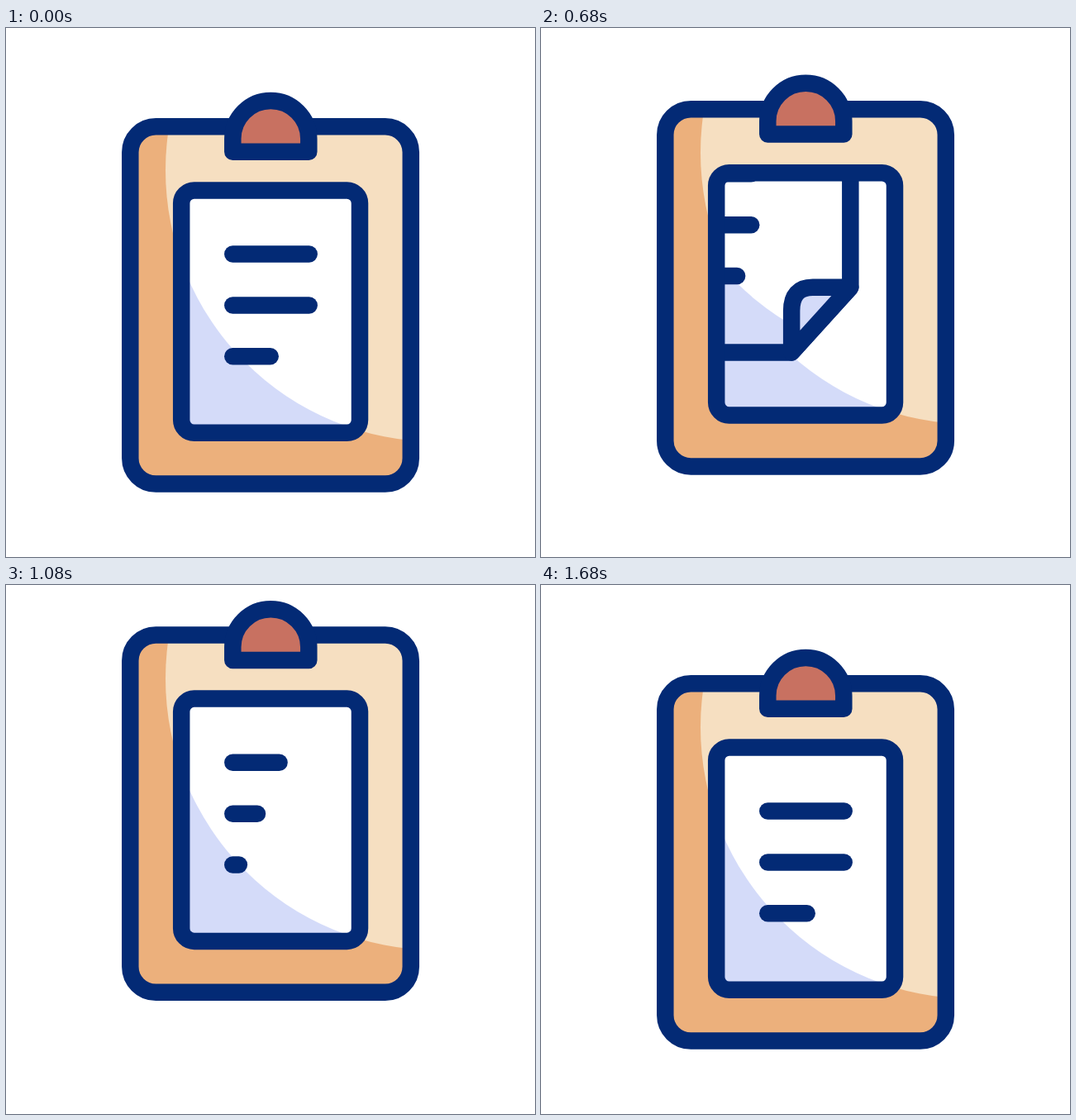
An HTML page that plays this animation: 640 px wide and 640 px high, repeating every 2 s.

```html
<!DOCTYPE html>
<html lang="en">
<head>
<meta charset="utf-8">
<title>Clipboard</title>
<style>
  html, body { margin: 0; width: 100%; height: 100%; overflow: hidden; background: #fff; }
  svg { display: block; width: 100vw; height: 100vh; }
  .ink { fill: none; stroke: #032a75; stroke-width: 20.5; stroke-linecap: round; stroke-linejoin: round; }
</style>
</head>
<body>
<svg viewBox="0 0 640 640">
  <defs>
    <rect id="board" x="150.3" y="119.3" width="339.5" height="432.3" rx="31"/>
    <rect id="paper" x="212.2" y="196.4" width="215.8" height="293.3" rx="15.5"/>
    <circle id="light" cx="521.6" cy="172" r="328.6"/>
    <clipPath id="inBoard"><use href="#board"/></clipPath>
    <clipPath id="inPaper"><use href="#paper"/></clipPath>
    <clipPath id="inSheet"><path id="sheetClip"/></clipPath>
  </defs>
  <g id="all">
    <g clip-path="url(#inBoard)">
      <use href="#board" fill="#ecb07c"/>
      <use href="#light" fill="#f6dfc1"/>
    </g>
    <use href="#board" class="ink"/>
    <path class="ink" style="fill:#c87161" d="M274.3 149.7V134A45.9 45.9 0 0 1 366.3 134V149.7Z"/>
    <g clip-path="url(#inPaper)">
      <use href="#paper" fill="#d4dbf9"/>
      <use href="#light" fill="#fff"/>
      <g id="newText" class="ink"><path/><path/><path/></g>
      <g id="sheet">
        <g clip-path="url(#inSheet)">
          <g id="slide">
            <rect x="202" y="186" width="500" height="500" fill="#d4dbf9"/>
            <use href="#light" fill="#fff"/>
            <g id="oldText" class="ink"><path/><path/><path/></g>
          </g>
        </g>
        <path id="edge" class="ink"/>
        <path id="flap" class="ink" style="fill:#d4dbf9"/>
      </g>
    </g>
    <use href="#paper" class="ink"/>
  </g>
</svg>
<script>
const LOOP = 2000, STEP = 40;
const LEFT = 274.3, ROWS = [273.5, 335.5, 397.3];
const $ = id => document.getElementById(id);
const clamp = x => Math.min(1, Math.max(0, x));
const smooth = x => x * x * (3 - 2 * x);

// cubic-bezier(p, 0, q, 1)
function ease(x, p, q) {
  let lo = 0, hi = 1;
  for (let i = 0; i < 24; i++) {
    const s = (lo + hi) / 2, r = 1 - s;
    if (3 * r * r * s * p + 3 * r * s * s * q + s * s * s < x) lo = s; else hi = s;
  }
  return smooth(hi);
}
const tween = (t, from, to, p, q) =>
  t <= from ? 0 : t >= to ? 1 : ease((t - from) / (to - from), p, q);

function setLines(group, lengths, parts) {
  [...group.children].forEach((line, i) => {
    line.setAttribute('d', parts[i] > 0
      ? `M${LEFT} ${ROWS[i]}h${Math.max(0.01, lengths[i] * parts[i])}` : '');
  });
}

function drawSheet(t) {
  const visible = t < 1000;
  $('sheet').style.display = visible ? '' : 'none';
  if (!visible) return;
  const k = 398 * smooth(clamp((t - 400) / 1000));
  const dx = -0.705 * k;
  const right = 428 + dx, bottom = 489.7 - k;
  const a = 13.6 * Math.pow(k, 0.382);
  const b = a * Math.min(1.25, 0.83 + 0.0036 * k);
  const x = right - a, y = bottom - b, r = 0.36;

  $('slide').setAttribute('transform', `translate(${dx} ${-k})`);
  const outline = `M${right} -300V${y}L${x} ${bottom}H-300`;
  $('sheetClip').setAttribute('d', outline + 'V-300Z');
  if (k > 0) {
    $('edge').setAttribute('d', outline);
    $('flap').setAttribute('d',
      `M${x} ${bottom}V${y + r * b}Q${x} ${y} ${x + r * a} ${y}H${right}Z`);
  } else {
    $('edge').setAttribute('d', '');
    $('flap').setAttribute('d', '');
  }
  const left = 1 - clamp((t - 575) / 165);
  setLines($('oldText'), [92.4, 92.4, 45.4], [left, left, left]);
}

function draw(t) {
  const lift = tween(t, 505, 1027, 0.42, 0.3) - tween(t, 1112, 1625, 0.42, 0.3);
  $('all').setAttribute('transform', `translate(0 ${-58.8 * lift})`);
  drawSheet(t);
  setLines($('newText'), [92.4, 92.4, 47.4],
    [800, 890, 943].map(s => tween(t, s, s + 660, 0.35, 0.3)));
}

function tick() {
  const t = performance.now() % LOOP;
  draw(Math.floor(t / STEP) * STEP);
  requestAnimationFrame(tick);
}
tick();
</script>
</body>
</html>
```
